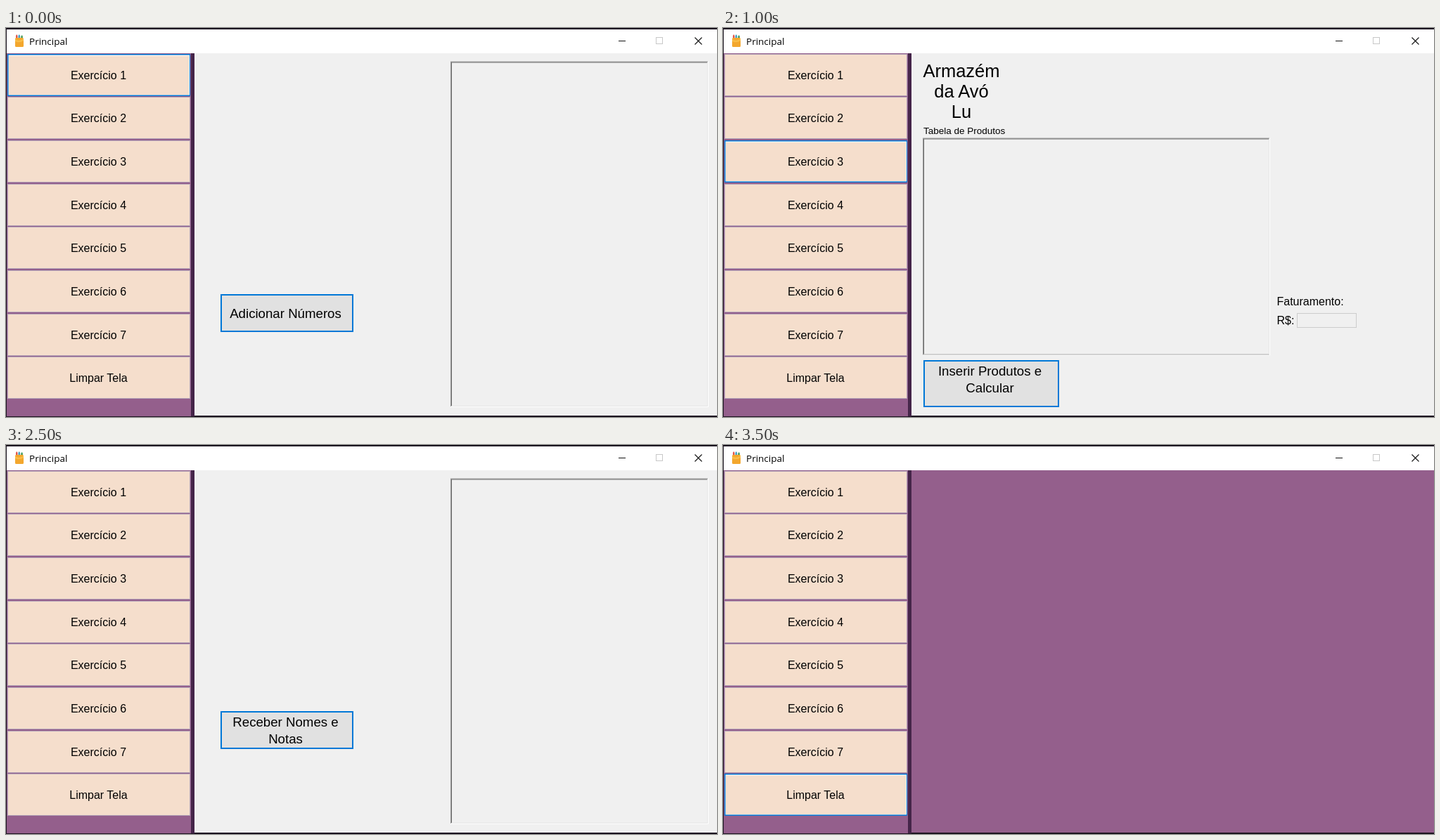
Write an HTML page that moves like this. It is 1011x554 px and loops after 4 s.

```html
<!DOCTYPE html>
<html lang="pt-BR">
<head>
<meta charset="utf-8">
<title>Principal</title>
<style>
  html, body { margin: 0; width: 100%; height: 100%; overflow: hidden; background: #f0f0f0; }
  svg { display: block; width: 1011px; height: 554px; }
  text { font-family: "Liberation Sans", Arial, sans-serif; white-space: pre; }
  .title { font: 13.5px "Open Sans", "Noto Sans", sans-serif; }
  .mid { text-anchor: middle; }
  .scene {
    visibility: hidden;
    animation: slot 4s step-end infinite;
    animation-delay: calc(var(--slot) * 500ms - 4000ms);
  }
  @keyframes slot {
    0% { visibility: visible; }
    12.5%, 100% { visibility: hidden; }
  }
</style>
</head>
<body>
<svg id="stage" viewBox="0 0 1011 554" xmlns="http://www.w3.org/2000/svg"></svg>
<script>
const PURPLE = '#945f8c', PEACH = '#f5decc', BLUE = '#0078d7', FACE = '#f0f0f0';
const TOPS = [37, 98, 160, 222, 283, 345, 407, 468];

const rect = (x, y, w, h, fill) =>
  `<rect x="${x}" y="${y}" width="${w}" height="${h}" fill="${fill}"/>`;

const framed = (x, y, w, h, fill, stroke, line = 1) =>
  `<rect x="${x + line / 2}" y="${y + line / 2}" width="${w - line}" height="${h - line}"
    fill="${fill}" stroke="${stroke}" stroke-width="${line}"/>`;

const text = (x, y, size, str, fill = '#000', cls = '') =>
  `<text x="${x}" y="${y}" font-size="${size}" fill="${fill}" class="${cls}">${str.replace(/</g, '&lt;')}</text>`;

const centred = (x, y, size, lines, step) =>
  lines.map((str, i) => text(x, y + i * step, size, str, '#000', 'mid')).join('');

// Sunken 3D border
const sunken = (x, y, w, h) =>
  rect(x, y, w, h, '#fff') +
  rect(x, y, w - 1, h - 1, '#9a9a9a') +
  rect(x + 1, y + 1, w - 2, h - 2, '#e6e6e6') +
  rect(x + 1, y + 1, w - 3, h - 3, '#696969') +
  rect(x + 2, y + 2, w - 4, h - 4, FACE);

const button = (x, y, w, h, lines, baseline) =>
  framed(x, y, w, h, '#e1e1e1', BLUE, 2) +
  centred(x + w / 2 - 2, baseline, 18.67, lines, 23.7);

const menuLabel = i =>
  text(131.5, TOPS[i] + 35.5, 16, i < 7 ? `Exercício ${i + 1}` : 'Limpar Tela', '#000', 'mid');

const menuButton = i => framed(2, TOPS[i], 260, 60, PEACH, '#b3a4b8') + menuLabel(i);

const focusedButton = i =>
  rect(2, TOPS[i], 260, 60, BLUE) +
  rect(3.5, TOPS[i] + 1.5, 257.5, 57, '#fdf6f0') +
  rect(4, TOPS[i] + 3, 256, 55, PEACH) + menuLabel(i);

const chrome = () =>
  rect(0, 0, 1011, 554, '#1c1420') +
  rect(1, 2, 1010, 34, '#fff') +
  rect(1, 36, 262, 517, PURPLE) +
  rect(263, 36, 5, 517, '#452549') +
  rect(268, 36, 743, 516, FACE) +
  `<path d="M14 15V11l1.2-2 1.3 2v4z" fill="#e2574c"/>
   <path d="M17.5 15v-4l1.2-2 1.3 2v4z" fill="#3f9fc4"/>
   <path d="M21 15v-3l1.7-2 1.3 2v3z" fill="#58a56b"/>
   <rect x="13" y="14" width="12" height="13" rx="1.5" fill="#f3a72e"/>
   <path d="M13 16q6 4 12-1v3q-6 4-12 1z" fill="#f9bd48"/>` +
  text(33, 24, 13.5, 'Principal', '#000', 'title') +
  rect(871, 18, 10, 1, '#111') +
  framed(924, 13, 10, 10, 'none', '#c8c8c8') +
  '<path d="M979.5 13.5l10 10m0-10l-10 10" stroke="#111" stroke-width="1.1"/>' +
  TOPS.map((_, i) => menuButton(i)).join('');

const listPane = (lines, baseline = 412.5) =>
  sunken(632, 47.5, 367, 492.5) + button(305, 379, 189, 54, lines, baseline);

const shopPane = () =>
  centred(339, 69.5, 25.5, ['Armazém', 'da Avó', 'Lu'], 29.3) +
  text(285, 151, 13.5, 'Tabela de Produtos') +
  sunken(284, 156.5, 494, 310) +
  button(285, 473, 193, 67, ['Inserir Produtos e', 'Calcular'], 495) +
  text(787.5, 395, 16, 'Faturamento:') +
  text(787.5, 422, 16, 'R$:') +
  framed(816, 406, 85, 21, FACE, '#cccccc');

const CODE = `string[] Alunos = {"Juliana", "Bento", "Túlio", "Sabina", "Flavio", "Fernando", "Nara",
"Karen", "Pingo"};
Int32 I, Total = 0;
Int32 N = Alunos.Length;

for (I = 0; I < N-1; I++)
{
     Total += Alunos[I].Length;
}


/*
Ao final do laço, podemos afirmar que Total vale:
a) 51     b)50     c)46     d)48
*/`;

const codePane = () =>
  text(278.5, 58, 13.3, 'Exercício 4:') +
  sunken(274.5, 65, 542, 302) +
  CODE.split('\n').map((line, i) => text(277, 81.5 + i * 17.05, 14, line, '#6d6d6d')).join('') +
  text(290, 399, 13.5, 'Resposta:') +
  framed(361.5, 385, 54.5, 21, FACE, '#cccccc') +
  button(280, 442, 183.5, 64, ['Descobrir', 'Resposta!'], 468.5);

const scenes = [
  focusedButton(0) + listPane(['Adicionar Números']),
  focusedButton(1) + listPane(['Adicionar Números']),
  focusedButton(2) + shopPane(),
  focusedButton(3) + codePane(),
  listPane(['Imprimir Nomes']),
  listPane(['Receber Nomes e', 'Notas'], 401),
  framed(521, 47, 479, 475, '#fff', '#828282') + button(305, 379, 189, 54, ['Receber Nomes'], 412.5),
  focusedButton(7) + rect(268, 36, 743, 516, PURPLE)
];

document.getElementById('stage').innerHTML = chrome() +
  scenes.map((body, i) => `<g class="scene" style="--slot:${i}">${body}</g>`).join('');
</script>
</body>
</html>
```
